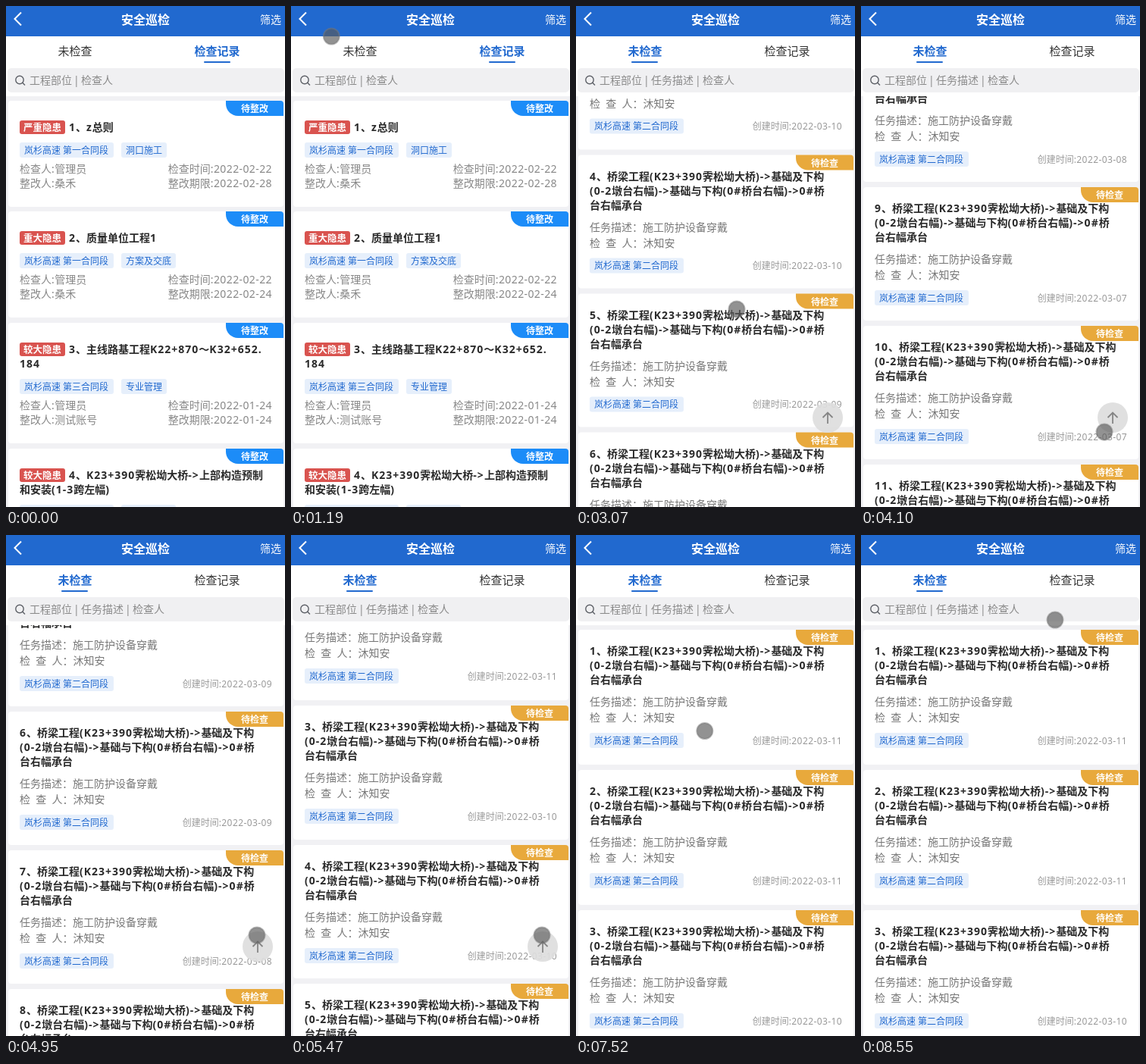
Animation, 368 px wide and 661 px high, one loop 8.72 s. Source, as an HTML page:

```html
<!DOCTYPE html>
<html lang="zh-CN">
<head>
<meta charset="utf-8">
<title>安全巡检</title>
<style>
html, body { margin: 0; width: 100%; height: 100%; overflow: hidden; background: #fff; }
svg { display: block; width: 368px; height: 661px; }
text { font-family: "Noto Sans", "Noto Sans CJK SC", "Noto Sans CJK", sans-serif; white-space: pre; }
.latin { letter-spacing: .4px; }
.bold { font-weight: 700; }
.medium { font-weight: 500; }
.bold .latin { letter-spacing: 1px; }
.hint { word-spacing: -1.7px; }
</style>
</head>
<body>
<svg id="stage" viewBox="0 0 368 661" xmlns="http://www.w3.org/2000/svg"></svg>
<script>
const BLUE = '#2169cf', ORANGE = '#e8a93c', SKY = '#1c8cf8', RED = '#d9534f', INK = '#2a2a2a';
const ROAD = '岚杉高速', BRIDGE = '霁松坳大桥';
const LOOP = 8720, STEP = 171, TOP = 125;

// ---- drawing helpers ----
const latin = s => s.replace(/[!-~]+/g, m =>
  `<tspan class="latin">${m.replace(/&/g, '&amp;').replace(/</g, '&lt;').replace(/>/g, '&gt;')}</tspan>`);

// y is the middle of the line
function label(x, y, size, fill, str, { bold = false, anchor = 'start', cls = '' } = {}) {
  return `<text x="${x}" y="${y + size * .38}" font-size="${size}" fill="${fill}" ` +
    `text-anchor="${anchor}" class="${bold ? 'bold' : ''} ${cls}">${latin(str)}</text>`;
}
const box = (x, y, w, h, r, fill) =>
  `<rect x="${x}" y="${y}" width="${w}" height="${h}" rx="${r}" fill="${fill}"/>`;
const chip = (x, y, chars, str) =>
  box(x, y - 10, chars * 12 + 12, 20, 3, '#e6effb') + label(x + 6, y, 12, BLUE, str);
const flag = (fill, str) =>
  `<path d="M290 0H362A4 4 0 0 1 366 4V20H306A16 16 0 0 1 290 4Z" fill="${fill}"/>` +
  label(328, 10.5, 12, '#fff', str, { bold: true, anchor: 'middle' });
const card = (y, h, inner) =>
  `<g transform="translate(0 ${y})">${box(3, 0, 363, h, 4, '#fff')}${inner}</g>`;

function taskCard(n, y, h, date) {
  const lines = [`${n}、桥梁工程(K23+390${BRIDGE})->基础及下构`,
    '(0-2墩台右幅)->基础与下构(0#桥台右幅)->0#桥', '台右幅承台'];
  return card(y, h, flag(ORANGE, '待检查') +
    lines.map((s, i) => label(18, 28 + i * 19, 14, INK, s, { bold: true })).join('') +
    label(18, 95, 14, '#777', '任务描述：施工防护设备穿戴') +
    label(18, 116, 14, '#777', '检  查  人：沐知安') +
    chip(18, 146, 9.33, ROAD + ' 第二合同段') +
    label(351, 146, 12, '#999', '创建时间:2022-03-' + date, { anchor: 'end' }));
}

function recordCard(y, level, lines, part, kind, person, found, due) {
  const d = (lines.length - 1) * 19;
  const right = { anchor: 'end' };
  return card(y, 140 + d, flag(SKY, '待整改') +
    box(18, 26, 60, 18, 3, RED) +
    label(48, 35, 12.5, '#fff', level + '隐患', { bold: true, anchor: 'middle' }) +
    lines.map((s, i) => label(i ? 18 : 83, 35 + i * 19, 14, INK, s, { bold: true })).join('') +
    chip(18, 65 + d, 9.33, `${ROAD} 第${part}合同段`) +
    chip(152, 65 + d, kind.length, kind) +
    label(18, 90 + d, 14, '#888', '检查人:管理员') +
    label(351, 90 + d, 14, '#888', '检查时间:2022-' + found, right) +
    label(18, 109 + d, 14, '#888', '整改人:' + person) +
    label(351, 109 + d, 14, '#888', '整改期限:2022-' + due, right));
}

// ---- content ----
const days = ['11', '11', '10', '10', '09', '09', '08', '08', '07', '07', '07', '07'];
let cardTop = TOP;
const tasks = days.map((day, i) => {
  const pitch = i < 2 ? 185 : i < 3 ? 184 : 183;
  const out = taskCard(i + 1, cardTop, pitch - 7, day);
  cardTop += pitch;
  return out;
}).join('');

const records =
  recordCard(125, '严重', ['1、z总则'], '一', '洞口施工', '桑禾', '02-22', '02-28') +
  recordCard(271, '重大', ['2、质量单位工程1'], '一', '方案及交底', '桑禾', '02-22', '02-24') +
  recordCard(418, '较大', ['3、主线路基工程K22+870～K32+652.', '184'], '三', '专业管理', '测试账号', '01-24', '01-24') +
  recordCard(584, '较大', [`4、K23+390${BRIDGE}->上部构造预制`, '和安装(1-3跨左幅)'], '三', '方案及交底', '测试账号', '01-24', '01-24');

function tabs(active, hint) {
  const tab = (i, x, str) => label(x, 59, 15, i === active ? BLUE : '#333', str,
    { bold: i === active, anchor: 'middle' });
  return tab(0, 91, '未检查') + tab(1, 278.5, '检查记录') +
    box(active ? 261 : 73, 73, 35, 2, 1, BLUE) +
    label(31, 98, 14, '#8a8a8a', hint, { cls: 'hint' });
}

const stage = document.getElementById('stage');
stage.innerHTML = `
  <defs>
    <clipPath id="listClip"><rect y="119" width="368" height="542"/></clipPath>
    <clipPath id="pageClip"><rect y="40" width="368" height="621"/></clipPath>
    <filter id="shadow" x="-30%" y="-30%" width="160%" height="160%">
      <feDropShadow dx="0" dy="1" stdDeviation="1.8" flood-opacity=".28"/>
    </filter>
  </defs>
  ${box(0, 0, 368, 661, 0, '#fff')}
  ${box(0, 0, 368, 40, 0, BLUE)}
  <path d="M20 8.5L11.5 17L20 25.5" fill="none" stroke="#fff" stroke-width="2"/>
  ${label(184, 18, 16, '#fff', '安全巡检', { bold: true, anchor: 'middle' })}
  ${label(335, 18, 14, '#fff', '筛选', { cls: 'medium' })}
  ${box(2, 82, 365, 32, 5, '#f0f0f2')}
  <g fill="none" stroke="#5c5f66" stroke-width="1.4">
    <circle cx="18" cy="97.5" r="5.2"/><path d="M21.8 101.3L25 104.5"/>
  </g>
  ${box(0, 119, 368, 542, 0, '#f1f1f4')}
  <g id="recordTab">${tabs(1, '工程部位 | 检查人')}<g clip-path="url(#listClip)">${records}</g></g>
  <g id="taskTab">${tabs(0, '工程部位 | 任务描述 | 检查人')}
    <g clip-path="url(#listClip)"><g id="list">${tasks}</g></g></g>
  <g id="toTop">
    <circle cx="332" cy="543" r="20" fill="#dedede" opacity=".92"/>
    <path d="M332 551V537M325.5 543L332 536.5L338.5 543" fill="none" stroke="#858585" stroke-width="1.8"/>
  </g>
  <g clip-path="url(#pageClip)"><g id="spinner">
    <circle r="20" fill="#fff" filter="url(#shadow)"/>
    <g id="icon"><path transform="translate(-12 -12)" fill="#2fb51f" stroke="#2fb51f" stroke-width=".6"
      d="M17.65 6.35A8 8 0 1 0 19.73 14H17.65A6 6 0 1 1 16.22 7.78L13 11H20V4Z"/></g>
  </g></g>
  <circle id="dot" r="10.5" stroke-width="2"/>`;

const el = id => document.getElementById(id);
const [recordTab, taskTab, list, toTop, spinner, icon, dot] =
  ['recordTab', 'taskTab', 'list', 'toTop', 'spinner', 'icon', 'dot'].map(el);

// ---- motion: [ms, value...] ----
const SWITCH = 1881;
const scrollKeys = [[2565, 0], [2907, 325], [3249, 640], [3591, 1090], [3933, 1355],
  [4446, 1355], [4959, 812], [5472, 270], [5727, 0]];
const pullKeys = [[5985, 18], [6327, 183], [7011, 183], [7353, 18]];
// x, y, state (0 hidden, 1 idle, 2 pressed)
const dotKeys = [[0, 256, 112, 0], [171, 250, 130, 1], [855, 40, 20, 1], [1368, 60, 50, 1],
  [1710, 91, 60, 1], [1881, 91, 60, 2], [2052, 91, 60, 1], [2394, 212, 565, 1],
  [2565, 212, 565, 2], [2907, 212, 240, 1], [3249, 212, 560, 2], [3591, 215, 240, 1],
  [4104, 321, 562, 1], [4446, 331, 528, 2], [4617, 331, 528, 1], [5643, 331, 528, 1],
  [5985, 180, 200, 2], [6327, 195, 480, 2], [6498, 195, 480, 0], [7353, 150, 300, 1],
  [8379, 269, 51, 1], [8550, 256, 112, 1]];

function at(keys, t) {
  let i = 0;
  while (i < keys.length - 1 && keys[i + 1][0] <= t) i++;
  const a = keys[i], b = keys[i + 1] || a;
  const p = b === a ? 0 : Math.max(0, (t - a[0]) / (b[0] - a[0]));
  const mix = k => a[k] + (b[k] - a[k]) * p;
  return { x: mix(1), y: mix(2), state: a[3] };
}
const show = (node, on) => node.setAttribute('visibility', on ? 'visible' : 'hidden');
const move = (node, x, y) => node.setAttribute('transform', `translate(${x} ${y})`);

function draw(ms) {
  const t = Math.floor(((ms + 10) % LOOP) / (LOOP / 51)) * STEP;
  const scroll = at(scrollKeys, t).x;
  const pull = at(pullKeys, t).x;
  const d = at(dotKeys, t);

  recordTab.style.display = t < SWITCH ? '' : 'none';
  taskTab.style.display = t < SWITCH ? 'none' : '';
  move(list, 0, -scroll);
  show(toTop, scroll > 200);

  show(spinner, pull > 18);
  move(spinner, 185, pull);
  const angle = t < 6498 ? (pull - 183) * 1.5 : (t - 6498) * .5;
  icon.setAttribute('transform', `rotate(${angle})`);

  show(dot, d.state > 0);
  move(dot, d.x, d.y);
  const hot = d.state === 2;
  dot.setAttribute('fill', hot ? 'rgba(184,182,50,.84)' : 'rgba(90,90,90,.66)');
  dot.setAttribute('stroke', hot ? 'rgba(222,226,100,.85)' : 'rgba(120,120,120,.5)');
}

const start = performance.now();
function tick() {
  draw((performance.now() - start) % LOOP);
  requestAnimationFrame(tick);
}
tick();
</script>
</body>
</html>
```
